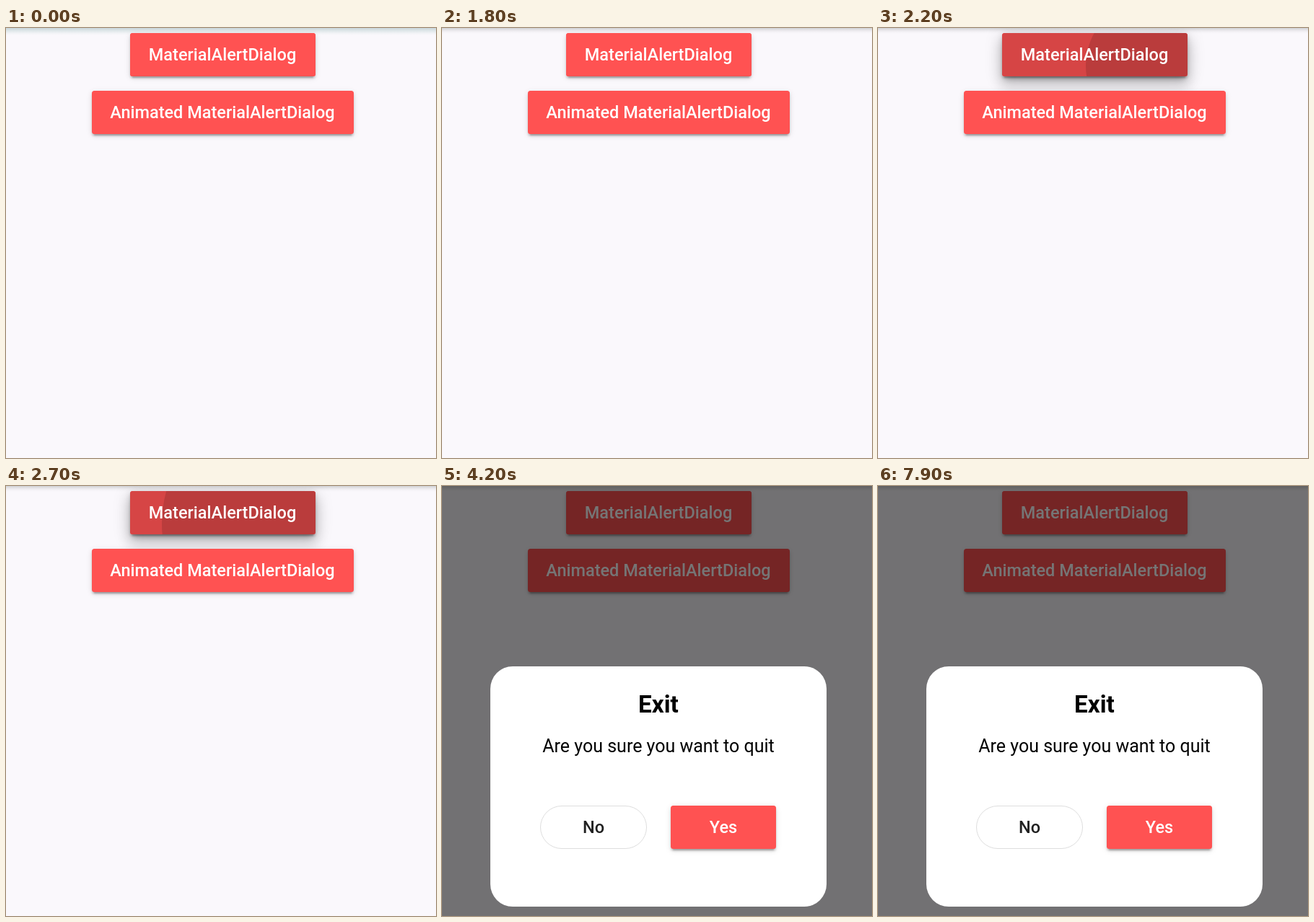
Write an HTML page that moves like this. It is 596x596 px and loops after 8000 ms.

```html
<!DOCTYPE html>
<html lang="en">
<head>
<meta charset="utf-8">
<title>Alert dialog demo</title>
<style>
  html, body { margin: 0; width: 100%; height: 100%; overflow: hidden; background: #faf8fc; }
  #stage { position: relative; width: 596px; height: 596px; overflow: hidden; background: #faf8fc; font-family: Roboto, sans-serif; }
  #stage div { position: absolute; box-sizing: border-box; white-space: nowrap; text-align: center; }
  #stage .full { inset: 0; }
  .bar { left: 0; top: 0; width: 100%; }
  #bar { height: 8px; background: linear-gradient(#cfd0d3, #e6e5e9 35%, #f5f3f7 70%, #faf8fc); }
  #tint { height: 10px; background: linear-gradient(#c9d5da, #e0e8ea 40%, #f3f4f7 75%, #faf8fc); }
  .btn { height: 60px; border-radius: 3.5px; font-size: 23.5px; font-weight: 500; line-height: 61px; color: #fff; background: #ff5252; }
  .rest { box-shadow: 0 5px 2px -3px #0003, 0 3px 3px #00000024, 0 2px 8px #0000001f; }
  .lift { opacity: 0; border-radius: 3.5px; box-shadow: 0 8px 8px -5px #0003, 0 13px 17px 2px #00000024, 0 5px 23px 3px #0000001f; }
  .ink { overflow: hidden; border-radius: 3.5px; }
  #press { background: rgba(0, 0, 0, .16); }
  #splash { border-radius: 50%; background: rgba(0, 0, 0, .135); }
  #veil { background: rgba(0, 0, 0, .54); }
  #card { left: 67px; top: 250px; width: 466px; height: 333px; border-radius: 31px; background: #fff; color: #000; }
  #title { left: 0; width: 100%; top: 33px; font-size: 33.3px; font-weight: 700; line-height: 40px; }
  #body { left: 0; width: 100%; top: 91px; font-size: 25px; line-height: 40px; }
  #no { left: 69px; top: 193px; width: 148px; border: 1.67px solid #dedede; border-radius: 30px; background: #fff; color: #212121; line-height: 58px; }
  #yes { left: 250px; top: 193px; width: 146px; }
</style>
</head>
<body>
<div id="stage">
  <div id="bar" class="bar"></div>
  <div id="tint" class="bar"></div>
  <div class="btn rest" style="left:171.5px;top:7px;width:257px">
    <div id="lift" class="full lift"></div>
    <div class="full ink" style="background:#ff5252">
      <div id="press" class="full"></div>
      <div id="splash"></div>
    </div>
    <div class="full">MaterialAlertDialog</div>
  </div>
  <div class="btn rest" style="left:118.5px;top:87px;width:363px">Animated MaterialAlertDialog</div>
  <div id="dialog" class="full">
    <div id="veil" class="full"></div>
    <div id="card">
      <div id="title">Exit</div>
      <div id="body">Are you sure you want to quit</div>
      <div id="no" class="btn">No</div>
      <div id="yes" class="btn rest">Yes</div>
    </div>
  </div>
</div>
<script>
  const LOOP = 8000, TICK = 100, OPEN = 2800;
  const TOUCH = { x: 208.5, y: 45 };
  // [time, value] pairs, linear in between
  const radius = [[1800, 0], [1900, 34], [2000, 57], [2200, 92], [2700, 164]];
  const press = [[1800, 0], [1900, .5], [2000, 1]];
  const tint = [[200, 1], [600, 0]];
  const $ = id => document.getElementById(id);

  function at(steps, t) {
    if (t <= steps[0][0]) return steps[0][1];
    for (let i = 1; i < steps.length; i++) {
      const [t0, a] = steps[i - 1], [t1, b] = steps[i];
      if (t <= t1) return a + (b - a) * (t - t0) / (t1 - t0);
    }
    return steps[steps.length - 1][1];
  }

  function draw(t) {
    const open = t >= OPEN;
    const level = open ? 0 : at(press, t);
    const r = open ? 0 : at(radius, t);
    $('tint').style.opacity = at(tint, t);
    $('press').style.opacity = level;
    $('lift').style.opacity = level;
    Object.assign($('splash').style, {
      left: TOUCH.x - r + 'px', top: TOUCH.y - r + 'px',
      width: 2 * r + 'px', height: 2 * r + 'px'
    });
    $('dialog').style.visibility = open ? 'visible' : 'hidden';
  }

  const start = performance.now();
  function loop() {
    const t = (performance.now() - start) % LOOP;
    draw(Math.floor(t / TICK) * TICK);
    requestAnimationFrame(loop);
  }
  draw(0);
  requestAnimationFrame(loop);
</script>
</body>
</html>
```
